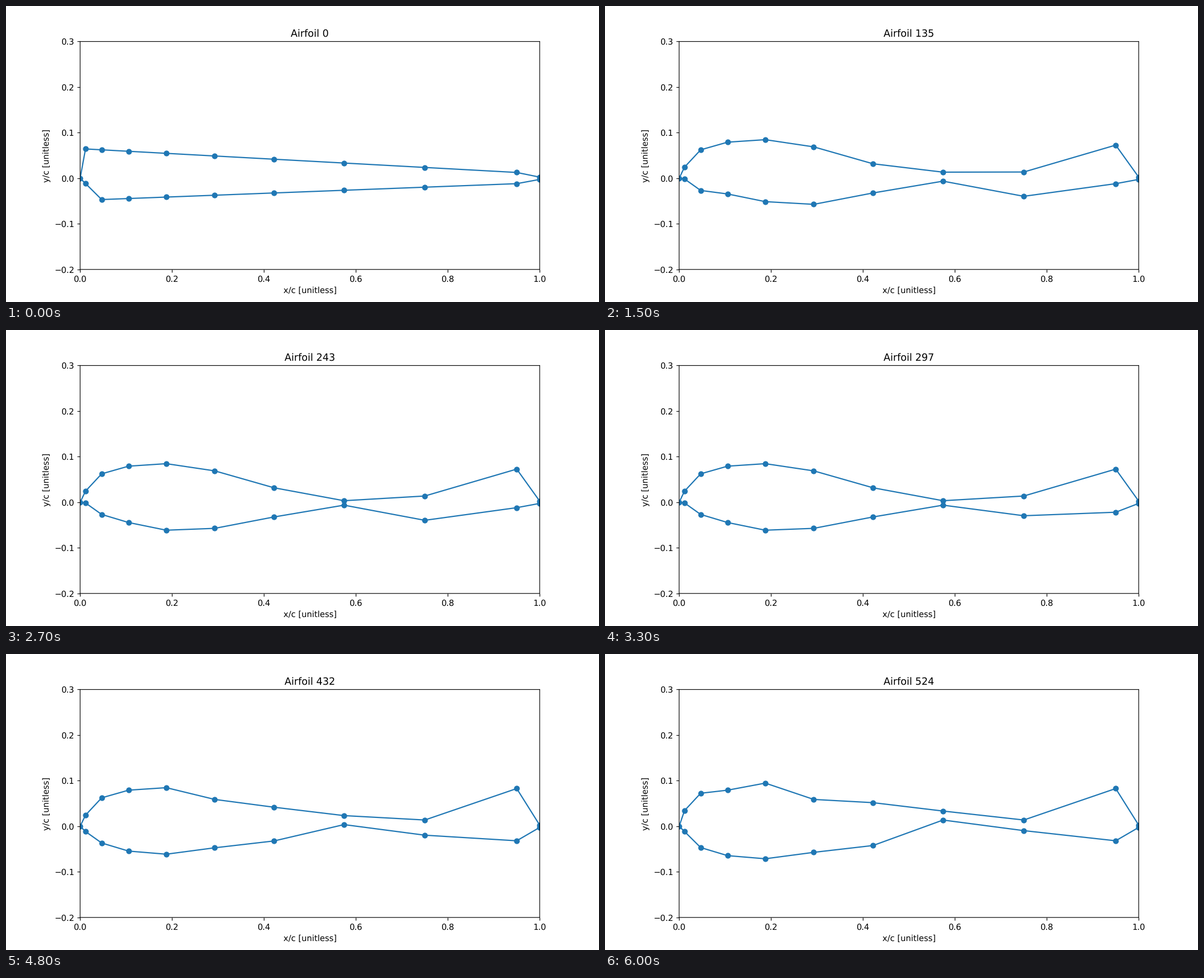
Animation of 1058x529 px, one loop 6300 ms. Source, as a matplotlib script:

```python
import numpy as np
import matplotlib.pyplot as plt
from matplotlib.animation import FuncAnimation

FRAMES = 21
INTERVAL = 300
STEP = 0.01  # control points sit on a grid of this size
LAST = 524

plt.rcParams.update({"path.snap": False, "text.hinting": "none"})

# Chordwise stations between the leading and the trailing edge
x = np.append(0.75 * (np.arange(1, 9) / 8) ** 2, 0.95)
wedge_top = 0.065 - 0.055 * x
wedge_bottom = -0.0485 + 0.0386 * x
wedge_bottom[0] = -0.0115

# Key poses: frame, easing power, grid steps away from the wedge (top, bottom)
POSES = [
    (0, 1, [0] * 9, [0] * 9),
    (3, 0.3, [-3, 0, 2, 3, 1, -1, -1, -1, 6], [1, 3, 2, 0, -1, 0, 2, -2, 0]),
    (7, 1, [-4, 0, 2, 3, 2, -1, -3, -1, 6], [1, 2, 0, -2, -2, 0, 2, -2, 0]),
    (13, 2, [-5, 0, 2, 3, 1, 0, -2, -1, 7], [0, 1, -1, -2, -1, 0, 2, 0, -2]),
    (20, 1, [-3, 1, 2, 4, 1, 1, 0, -1, 7], [0, 0, -2, -3, -2, -1, 4, 1, -2]),
]


def offsets(frame):
    """Ease between the neighbouring poses and round to the grid."""
    for (t0, _, *a), (t1, power, *b) in zip(POSES, POSES[1:]):
        if frame <= t1:
            s = ((frame - t0) / (t1 - t0)) ** power
            return STEP * np.round((1 - s) * np.array(a) + s * np.array(b))


def outline(frame):
    """Heights from the upper trailing edge round the nose to the lower one."""
    up, down = offsets(frame)
    top, bottom = wedge_top + up, wedge_bottom + down
    return np.concatenate([[0.0025], top[::-1], [0], bottom, [-0.0025]])


fig, ax = plt.subplots(figsize=(10, 5), dpi=105.8)
ax.set_xlim(0, 1)
ax.set_ylim(-0.2, 0.3)
ax.set_xlabel("x/c [unitless]")
ax.set_ylabel("y/c [unitless]")
title = ax.set_title("Airfoil 0")
xs = np.concatenate([[1], x[::-1], [0], x, [1]])
line, = ax.plot(xs, outline(0), "o-", color="C0")


def update(frame):
    line.set_ydata(outline(frame))
    title.set_text(f"Airfoil {min(27 * frame, LAST)}")
    return line, title


anim = FuncAnimation(fig, update, frames=FRAMES, interval=INTERVAL, repeat=True)
plt.show()
```
